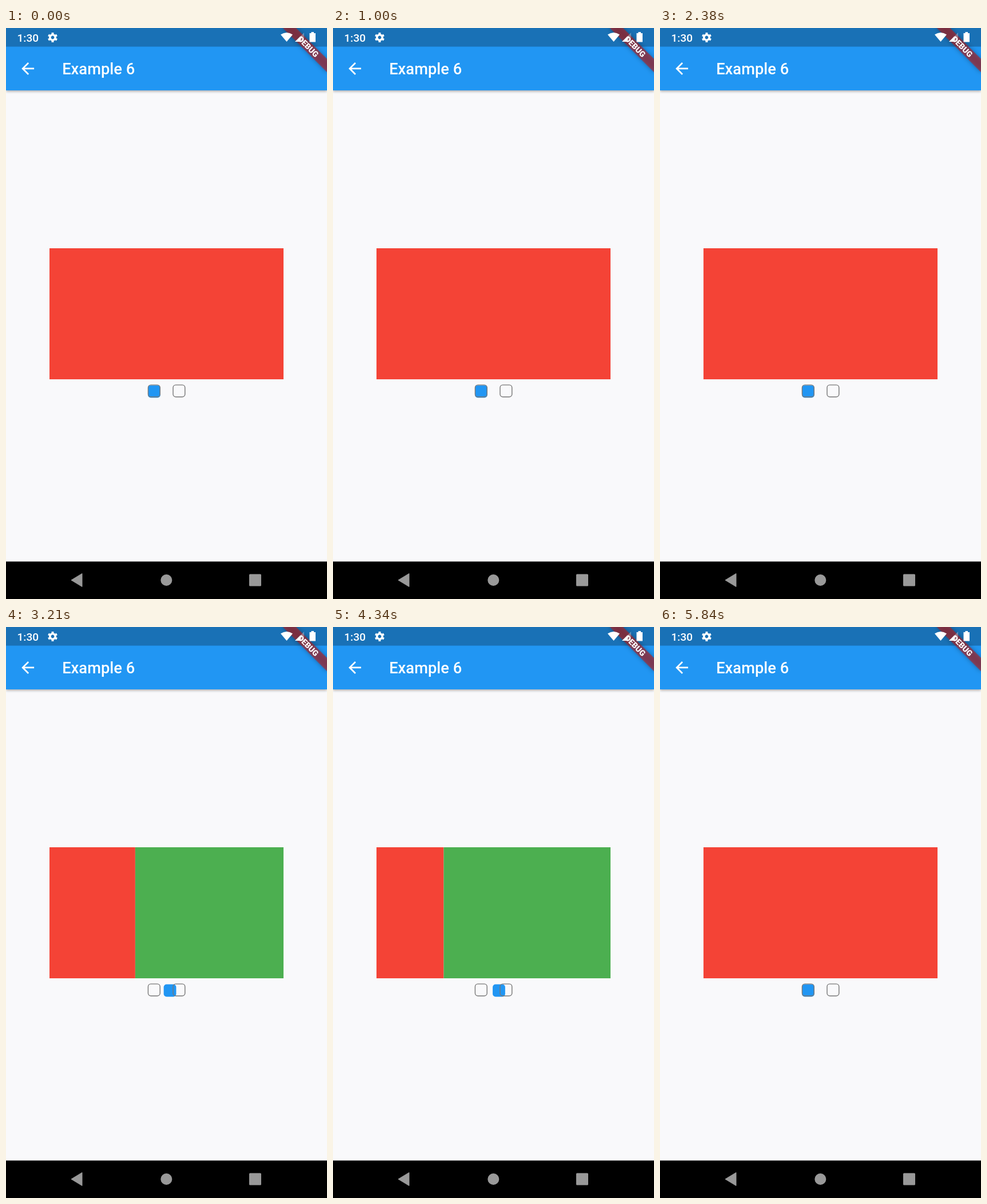
Recreate the animation shown at these times as an HTML page. Size 561 by 998 pixels, loop 5.89 s.

```html
<!DOCTYPE html>
<html lang="en">
<head>
<meta charset="utf-8">
<title>Page indicator</title>
<style>
  html, body { margin: 0; width: 100%; height: 100%; overflow: hidden; background: #f9f9fb; }
  svg { display: block; }
  #stage { width: 561px; height: 998px; }
  text { font-family: Roboto, sans-serif; font-weight: 500; fill: #fff; }
  .bar { filter: drop-shadow(0 2px 2px rgba(0, 0, 0, .3)); }
  .banner { filter: drop-shadow(0 0 4px rgba(0, 0, 0, .5)); }
  .box { fill: none; stroke: #777; stroke-width: 1.4; }
</style>
</head>
<body>
<svg id="stage" viewBox="0 0 561 998">
  <rect width="561" height="998" fill="#f9f9fb"/>

  <!-- pages -->
  <svg x="76" y="385" width="409" height="229">
    <rect id="red" width="409" height="229" fill="#f44336"/>
    <rect id="green" x="409" width="409" height="229" fill="#4caf50"/>
  </svg>

  <!-- indicator -->
  <rect id="ink" y="623.7" width="43.6" height="24" opacity="0"/>
  <rect id="dot" x="248" y="624.5" width="21.8" height="21.8" rx="5" fill="#2196f3"/>
  <rect class="box" x="248.4" y="623.9" width="20.8" height="20.8" rx="4.8"/>
  <rect class="box" x="292" y="623.9" width="20.8" height="20.8" rx="4.8"/>

  <!-- app bar -->
  <rect class="bar" width="561" height="109" fill="#2196f3"/>
  <rect width="561" height="32.6" fill="#1971b6"/>
  <path transform="translate(21.8 54.6) scale(1.364)" fill="#fff"
    d="M20 11H7.83l5.59-5.59L12 4l-8 8 8 8 1.41-1.41L7.83 13H20v-2z"/>
  <text x="98.2" y="81" font-size="27.3">Example 6</text>

  <!-- debug banner -->
  <g transform="translate(561 0) rotate(45)">
    <rect class="banner" x="-54.6" y="38.2" width="109.2" height="16.4" fill="rgb(183 28 28 / .63)"/>
    <text y="51.2" text-anchor="middle" font-size="13.9" style="font-weight:900">DEBUG</text>
  </g>

  <!-- status icons -->
  <text x="19.5" y="24" font-size="19.1">1:30</text>
  <g fill="none" stroke="#fff" transform="translate(81.5 16.5)">
    <circle r="4.7" stroke-width="3.6"/>
    <circle r="7" stroke-width="3.2" pathLength="6" stroke-dasharray=".5 .5" stroke-dashoffset="-.25"/>
  </g>
  <g fill="#fff">
    <path d="M480 11.5Q490.5 4.5 501 11.5L490.5 24Z"/>
    <path d="M505 24L521 8V24Z" opacity=".3"/>
    <path d="M505 24L515 14V24Z"/>
    <path d="M533.5 7h4.5v2h3v15.5h-10.500v-15.500h3z"/>
  </g>

  <!-- navigation bar -->
  <rect y="932.5" width="561" height="65.5"/>
  <g fill="#999">
    <path d="M114 965L133 953.500V976.500Z" stroke="#999" stroke-linejoin="round"/>
    <circle cx="280.3" cy="965" r="10"/>
    <rect x="425" y="954.5" width="21" height="21" rx="1.5"/>
  </g>
</svg>
<script>
  const LOOP = 5890, PAGE = 409, STEP = 43.6, LEAD = 44;
  const moves = [
    { start: 1120, length: 300, to: 1, tap: true },
    { start: 1630, length: 300, to: 0, tap: true },
    { start: 2916, length: 500, to: 1 },
    { start: 4164, length: 500, to: 0 }
  ];
  const [red, green, ink, dot] = ['red', 'green', 'ink', 'dot'].map(id => document.getElementById(id));
  const clamp = v => Math.min(1, Math.max(0, v));
  const smooth = u => u * u * (3 - 2 * u);

  const lastMove = t => moves.findLast(m => t >= m.start);

  function position(t) {
    const m = lastMove(t);
    if (!m) return 0;
    const p = smooth(clamp((t - m.start) / m.length));
    return m.to ? p : 1 - p;
  }

  function drawInk(t) {
    const m = moves.find(m => m.tap && t > m.start - 60 && t < m.start + 320);
    if (!m) return ink.setAttribute('opacity', 0);
    const age = t - m.start;
    ink.setAttribute('x', 237 + m.to * STEP);
    ink.setAttribute('opacity', .055 * clamp((age + 60) / 80) * clamp((320 - age) / 150));
  }

  function draw(now) {
    const t = now % LOOP;
    const page = position(t);
    // A tapped dot runs slightly ahead of its page.
    const tapped = lastMove(t + LEAD)?.tap;
    const mark = tapped ? position(t + LEAD) : page;
    red.setAttribute('x', -page * PAGE);
    green.setAttribute('x', (1 - page) * PAGE);
    dot.setAttribute('x', 248 + mark * STEP);
    drawInk(t);
    requestAnimationFrame(draw);
  }
  requestAnimationFrame(draw);
</script>
</body>
</html>
```
